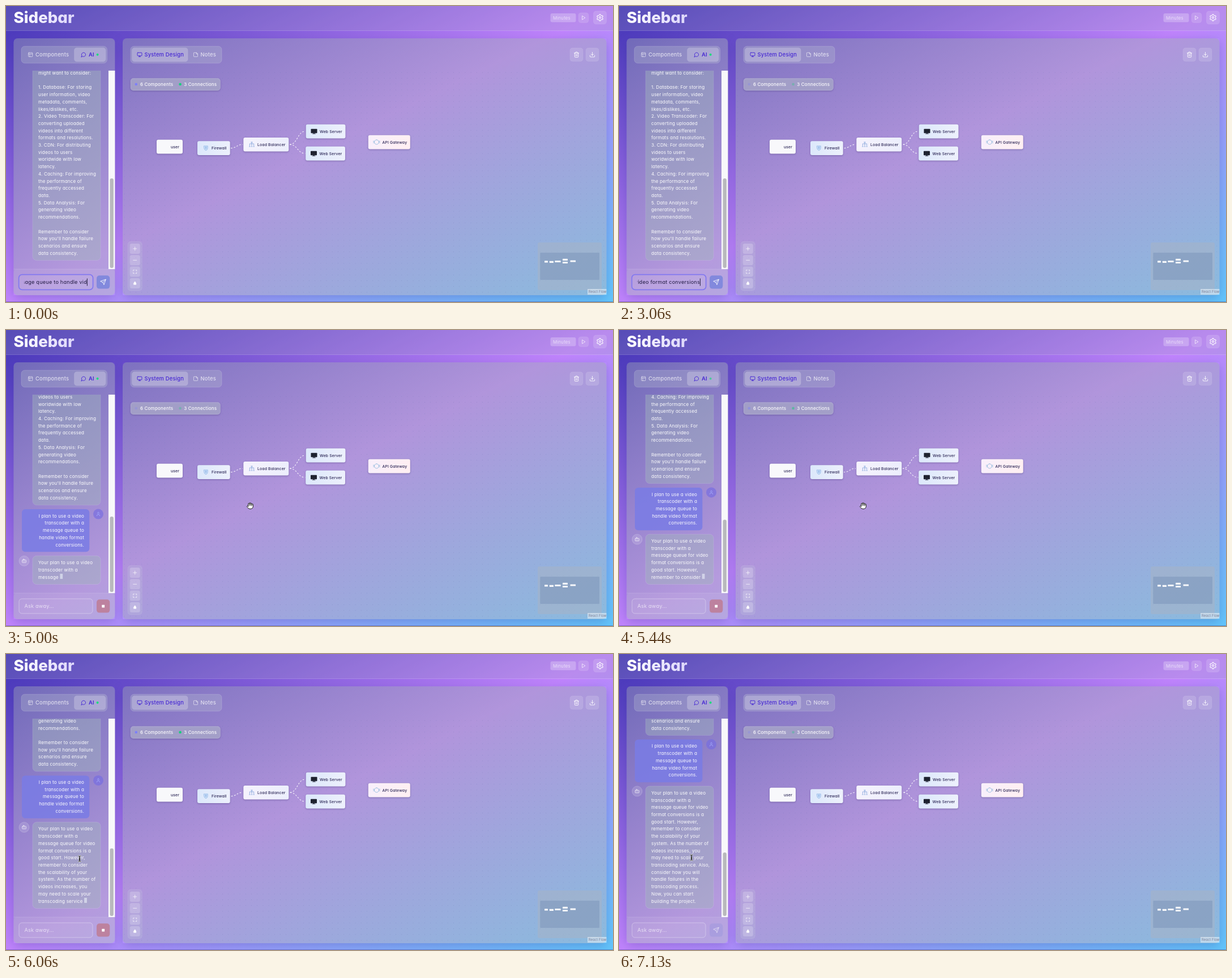
An HTML page for the animation above (7.19 s loop, 1072 px wide and 522 px high).

```html
<!DOCTYPE html>
<html lang="en">
<head>
<meta charset="utf-8">
<title>Sidebar</title>
<style>
html, body { margin: 0; width: 100%; height: 100%; overflow: hidden; background: #8a6be0; }
svg { display: block; }
text { font-family: Inter, "Open Sans", sans-serif; font-feature-settings: "cv11"; letter-spacing: .022em; white-space: pre; }
.icon { fill: none; stroke-linecap: round; stroke-linejoin: round; }
.node { filter: drop-shadow(0 1.5px 1.5px rgba(40, 30, 90, .35)); }
.edge { fill: none; stroke: #fff; stroke-opacity: .85; stroke-width: 1.1; stroke-dasharray: 2.7; }
.shade { filter: blur(9px); }
</style>
</head>
<body>
<svg id="stage" width="1072" height="522" viewBox="0 0 1072 522"></svg>
<script>
const LOOP = 7190, SENT = 3500, REPLY = 4690, TOKEN_MS = 29.6, DONE = 6800;
const LINE = 12.71, BOTTOM = 448.6;
const white = a => `rgba(255,255,255,${a})`;

// Builders
const rect = (x, y, w, h, r, fill, more = "") =>
  `<rect x="${x}" y="${y}" width="${w}" height="${h}" rx="${r}" fill="${fill}" ${more}/>`;
const circle = (x, y, r, fill, more = "") =>
  `<circle cx="${x}" cy="${y}" r="${r}" fill="${fill}" ${more}/>`;
const text = (x, y, str, size, fill, weight = 400, more = "") =>
  `<text x="${x}" y="${y}" font-size="${(size * 1.03).toFixed(2)}" fill="${fill}" font-weight="${weight}" ${more}>${str}</text>`;
const icon = (d, x, y, size, color, width = 2, fill = "none") =>
  `<path class="icon" d="${d}" transform="translate(${x - size / 2} ${y - size / 2}) scale(${size / 24})" stroke="${color}" stroke-width="${width}" style="fill:${fill}"/>`;
const border = a => `stroke="${white(a)}" stroke-width=".8"`;
const lines = (list, x, y, more = "") =>
  list.map((s, i) => text(x, (y + i * LINE).toFixed(2), s, 7.8, white(.97), 400, more)).join("");

const paths = {
  layout: "M5 3h14a2 2 0 0 1 2 2v14a2 2 0 0 1-2 2H5a2 2 0 0 1-2-2V5a2 2 0 0 1 2-2zM3 9h18M9 21V9",
  chat: "M8 20A9 9 0 1 0 4 16L2 22z",
  monitor: "M4 3h16a2 2 0 0 1 2 2v10a2 2 0 0 1-2 2H4a2 2 0 0 1-2-2V5a2 2 0 0 1 2-2zM8 21h8M12 17v4",
  note: "M15 3H5a2 2 0 0 0-2 2v14a2 2 0 0 0 2 2h14a2 2 0 0 0 2-2V9zM15 3v6h6",
  trash: "M3 6h18M19 6v14a2 2 0 0 1-2 2H7a2 2 0 0 1-2-2V6M8 6V4a2 2 0 0 1 2-2h4a2 2 0 0 1 2 2v2M10 11v6M14 11v6",
  download: "M21 15v4a2 2 0 0 1-2 2H5a2 2 0 0 1-2-2v-4M7 10l5 5 5-5M12 15V3",
  play: "M6 3l14 9-14 9z",
  send: "M22 2L11 13M22 2l-7 20-4-9-9-4z",
  user: "M12 3a4 4 0 1 0 .01 0M5 21v-2a4 4 0 0 1 4-4h6a4 4 0 0 1 4 4v2",
  bot: "M12 8V4H8M5 8h14a2 2 0 0 1 2 2v8a2 2 0 0 1-2 2H5a2 2 0 0 1-2-2v-8a2 2 0 0 1 2-2zM9 13v2M15 13v2",
  plus: "M3 12h18M12 3v18",
  minus: "M3 12h18",
  fit: "M3 8V3h5M16 3h5v5M21 16v5h-5M8 21H3v-5",
  lock: "M5 11h14v9H5zM8 11V7a4 4 0 0 1 8 0v4",
  hand: "M6 14V6a2 2 0 0 1 4 0V4a2 2 0 0 1 4 0v2a2 2 0 0 1 4 0v2a2 2 0 0 1 4 0v6a8 8 0 0 1-8 8h-2c-2.8 0-4.5-.9-6-2.3l-3.6-3.6a2 2 0 0 1 2.8-2.9zM10 6v5M14 6v5M18 8v4",
  beam: "M8 2q4 0 4 3v14q0 3-4 3M16 2q-4 0-4 3v14q0 3 4 3M9.5 14h5",
  shield: "M4 3h16v9q0 7-8 10q-8-3-8-10zM9 8h6M9 12h6M12 6v10",
  balance: "M12 3v6M4 18V9h16v9M12 9v9M2 20h4M10 20h4M18 20h4M9 3h6",
  gateway: "M12 4a8 8 0 1 0 .01 0M0 9h4M0 14h4M20 9h4M20 14h4"
};
const gear = "M" + Array.from({ length: 24 }, (_, i) => {
  const a = (i - .5) * Math.PI / 12, r = i % 4 < 2 ? 10.5 : 7.8;
  return (12 + r * Math.sin(a)).toFixed(1) + " " + (12 - r * Math.cos(a)).toFixed(1);
}).join("L") + "zM12 9a3 3 0 1 0 .01 0";

// Copy
const draft = "I plan to use a video transcoder with a message queue to handle video format conversions.";
const advice = `might want to consider:

1. Database: For storing
user information, video
metadata, comments,
likes/dislikes, etc.
2. Video Transcoder: For
converting uploaded
videos into different
formats and resolutions.
3. CDN: For distributing
videos to users
worldwide with low
latency.
4. Caching: For improving
the performance of
frequently accessed
data.
5. Data Analysis: For
generating video
recommendations.

Remember to consider
how you'll handle failure
scenarios and ensure
data consistency.`.split("\n");
const question = ["I plan to use a video", "transcoder with a", "message queue to", "handle video format", "conversions."];
const tokens = `Your plan to use a video
transcoder with a
message queue for video
format conversions is a
good start. However,
remember to consider
the scalability of your
system. As the number of
videos increases, you
may need to scale your
transcoding service. Also,
consider how you will
handle failures in the
transcoding process.
Now, you can start
building the project.`.match(/\s?\w+|[.,]/g);

// Scene parts
const defs = `<defs>
  <linearGradient id="sky" x2="1" y2="1"><stop stop-color="#4234b6"/><stop offset=".5" stop-color="#c084fc"/><stop offset="1" stop-color="#62c6fb"/></linearGradient>
  <linearGradient id="glass" x2="1" y2="1"><stop stop-color="#969db2" stop-opacity=".46"/><stop offset="1" stop-color="#aeb3c3" stop-opacity=".52"/></linearGradient>
  <linearGradient id="logo"><stop stop-color="#fff"/><stop offset="1" stop-color="#ddd7fb"/></linearGradient>
  <linearGradient id="pink"><stop stop-color="#f8effb"/><stop offset="1" stop-color="#ffeff2"/></linearGradient>
  <linearGradient id="ice"><stop stop-color="#dce8fb"/><stop offset="1" stop-color="#edf0fc"/></linearGradient>
  <linearGradient id="lilac"><stop stop-color="#f5f2fd"/><stop offset="1" stop-color="#eceefc"/></linearGradient>
  <pattern id="dots" width="10.2" height="10.2" patternUnits="userSpaceOnUse"><circle cx="5" cy="5" r=".5" fill="#5d6aa8" fill-opacity=".3"/></pattern>
  <clipPath id="chatClip"><rect x="13" y="114" width="168" height="350"/></clipPath>
  <clipPath id="inputClip"><rect x="32" y="475" width="114" height="24"/></clipPath>
  <clipPath id="gaps"><path clip-rule="evenodd" d="M0 44H1072V522H0zM13.4 57h179v453h-179zM206 57h854.5v453H206z"/></clipPath>
</defs>`;

const panels = [[13.4, 179], [206, 854.5]];
const shadows = `<g clip-path="url(#gaps)">` +
  panels.map(([x, w]) => rect(x, 62, w, 453, 7, "rgba(31,38,135,.24)", 'class="shade"')).join("") + `</g>`;
const glass = panels.map(([x, w]) => rect(x, 57, w, 453, 7, "url(#glass)")).join("");
const button = (x, y, w, h, d, size) =>
  rect(x, y, w, h, 4.5, white(.14), border(.1)) + icon(d, x + w / 2, y + h / 2, size, white(.95));

const header = rect(0, 0, 1072, 43.5, 0, "rgba(160,163,185,.22)") + rect(0, 43, 1072, .8, 0, white(.22)) +
  `<text x="13.5" y="30.3" font-size="27.6" font-weight="800" fill="url(#logo)" style="letter-spacing:0">Sidebar</text>` +
  rect(961.5, 13, 45, 15.5, 3, white(.24)) + text(966, 23.6, "Minutes", 7.7, white(.6)) +
  button(1011, 12, 18, 17.5, paths.play, 8.5) + button(1037.5, 9, 23, 23, gear, 13);

const tabBar = (x, w) => rect(x, 71, w, 29.8, 6, "rgba(185,198,208,.28)", border(.2));
const tab = (x, w) => rect(x, 73.7, w, 24.4, 4.5, white(.23), border(.12));
const violet = "#4526d3", muted = white(.7);

const leftPanel = tabBar(27, 151.5) + tab(120.5, 55.5) +
  icon(paths.layout, 43.2, 85.8, 9.5, muted) + text(52, 89.1, "Components", 9.1, muted, 500) +
  icon(paths.chat, 137, 85.8, 9.5, violet, 2.3) + text(146, 89.1, "AI", 9.1, violet, 600) +
  circle(161.6, 85.8, 2, "#16dc7c", 'id="live"') +
  rect(13.4, 464, 179, 46, 6, white(.06)) + rect(13.4, 463.7, 179, .7, 0, white(.18)) +
  rect(181, 114, 11.4, 350, 0, "#f8f8fa") + `<rect id="thumb" x="183.5" width="6.4" rx="3.2" fill="#b9b9bd"/>`;

const bubble = "rgba(160,178,188,.46)";
const adviceH = advice.length * LINE;
const chat = `<g clip-path="url(#chatClip)">
  <g id="advice">${rect(47, -adviceH - 60, 120, adviceH + 60, 7, bubble, border(.14))}
    ${lines(advice, 57, -9.9 - (advice.length - 1) * LINE)}</g>
  <g id="question">${rect(28, 0, 119.3, 75.3, 6, "rgba(122,124,230,.85)")}
    ${lines(question, 138, 14.6, 'text-anchor="end"')}
    ${circle(163, 8.5, 9, "rgba(116,108,226,.65)")}${icon(paths.user, 163, 8.5, 8.5, "#a9b2ff")}</g>
  <g id="reply">${circle(32, 9, 9, white(.14), border(.22))}${icon(paths.bot, 32, 8.8, 9, white(.9))}
    <rect id="replyBox" x="47" rx="7" fill="${bubble}" ${border(.16)}/>
    <g id="replyText">${lines(Array(16).fill(""), 57, 14.9)}</g>
    ${rect(0, 0, 4.8, 9, 0, "rgba(222,226,240,.75)", 'id="block"')}</g></g>`;

const composer = `<g id="ring">${rect(22.6, 473.6, 131, 26.8, 6, white(.06), 'stroke="#8378f0" stroke-width="1.8"')}</g>
  <g id="idle">${rect(23, 474, 130, 26, 5, white(.04), border(.42))}${text(32.5, 490.2, "Ask away...", 8.9, white(.66))}</g>
  <g id="typing" clip-path="url(#inputClip)">${text(143, 490.2, "", 8.9, "#241d45", 400, 'id="draft" text-anchor="end"')}
    ${rect(142.9, 480.5, .9, 13, 0, "#17122f")}</g>
  <g id="send">${rect(160, 475.3, 23.3, 23.3, 5, "rgba(118,130,220,.82)", 'id="sendBox"')}${icon(paths.send, 171.6, 487, 11, white(.95))}</g>
  <g id="stop">${rect(160, 475.3, 23.3, 23.3, 5, "rgba(190,122,144,.82)")}${rect(169.3, 484.8, 4.8, 4.8, .5, "#fff")}</g>`;

const node = (x, y, w, fill, label, tx, art = "") => `<g class="node">${rect(x, y, w, 24.6, 3, fill)}</g>` +
  text(tx, y + 14.8, label, 6.65, "#2b2655", 500) + art;
const screen = (x, y) => rect(x - 5.5, y - 4.3, 11, 7.6, .8, "#1e2230") + rect(x - 1.5, y + 3, 3, 1.5, 0, "#454b5c") +
  rect(x - 3, y + 4.2, 6, .9, .3, "#454b5c");
const edge = (x1, y1, x2, y2) => {
  const m = (x1 + x2) / 2;
  return `<path class="edge" d="M${x1} ${y1}C${m} ${y1} ${m} ${y2} ${x2} ${y2}"/>`;
};
const diagram = edge(397, 250.6, 418, 244.2) + edge(501, 244.2, 528.5, 221) + edge(501, 244.2, 528.5, 260) +
  node(266, 235.8, 46, "#f8f8fb", "user", 291) +
  node(338, 238.3, 57.7, "url(#ice)", "Firewall", 363, icon(paths.shield, 353, 250.6, 10, "#7fa9e2", 1.4, "#cbdff8")) +
  node(419.3, 232, 80, "url(#lilac)", "Load Balancer", 444, icon(paths.balance, 434, 244.3, 11, "#6f97d4", 1.5)) +
  node(529.7, 208.8, 69.8, "url(#ice)", "Web Server", 554, screen(544, 221)) +
  node(529.2, 247.8, 69.8, "url(#ice)", "Web Server", 553.6, screen(543.5, 260)) +
  node(639.8, 227.8, 74, "url(#pink)", "API Gateway", 664.5, icon(paths.gateway, 654.5, 240, 12, "#7fb0d8", 1.5));

const controls = rect(215, 415.5, 25.3, 86.5, 5, "rgba(190,196,215,.24)", border(.1)) +
  ["plus", "minus", "fit", "lock"].map((k, i) => {
    const y = 419 + i * 20.3;
    return rect(218.6, y, 18.2, 18, 3.5, white(.2)) + icon(paths[k], 227.7, y + 9, k == "lock" ? 7 : 8, white(.95), 2.2, k == "lock" ? "#fff" : "none");
  }).join("");

const miniNodes = [[951, 449.3, 6], [959.8, 449.8, 7.2], [969.3, 448.9, 10.3], [983, 445.8, 9], [983, 450.9, 9], [996.5, 448.4, 9.6]];
const minimap = rect(939, 417, 113, 84, 3, "rgba(166,180,200,.58)") + rect(943.3, 435, 104.7, 48, 1, "rgba(122,148,186,.5)") +
  miniNodes.map(([x, y, w]) => rect(x, y, w, 3.2, .4, white(.92))).join("");

const mainPanel = rect(206, 114, 854.5, 396, 0, "url(#dots)") +
  tabBar(220, 161) + tab(222.5, 98.7) +
  icon(paths.monitor, 236, 85.8, 9.5, violet, 2.3) + text(244.5, 89.1, "System Design", 9.1, violet, 500) +
  icon(paths.note, 335, 85.8, 9.5, muted) + text(343.5, 89.1, "Notes", 9.1, muted, 500) +
  `<g class="node">${rect(220, 127.6, 158.5, 21.3, 5, "rgba(172,170,206,.85)", border(.2))}</g>` +
  circle(229.8, 138, 2.3, "#7d80fa", 'id="dotA"') + text(237, 140.9, "6 Components", 7.8, white(.95), 500) +
  circle(307.6, 138, 2.3, "#16d07c", 'id="dotB"') + text(314.3, 140.9, "3 Connections", 7.8, white(.95), 500) +
  button(996, 74, 23, 23.5, paths.trash, 11) + button(1024, 74, 23, 23.5, paths.download, 11) +
  diagram + controls + minimap +
  rect(1027, 499, 33.5, 10, 0, white(.45)) + text(1029, 506.1, "React Flow", 5.6, "#7a7a90");

const pointer = `<g id="pointer"><g id="hand">${icon(paths.hand, 0, 0, 13, "#111", 1.8, "#fff")}</g>
  <g id="beam">${icon(paths.beam, 0, 0, 12, "#fff", 4)}${icon(paths.beam, 0, 0, 12, "#111", 2)}</g></g>`;

const stage = document.getElementById("stage");
stage.innerHTML = defs + rect(0, 0, 1072, 522, 0, "url(#sky)") + shadows + header + glass +
  leftPanel + chat + composer + mainPanel + rect(0, 521, 1072, 1, 0, "rgba(50,45,130,.4)") + pointer;

const el = {};
stage.querySelectorAll("[id]").forEach(n => el[n.id] = n);
const edges = stage.querySelectorAll(".edge"), rows = [...el.replyText.children];

// Motion
const show = (n, on) => n.setAttribute("visibility", on ? "inherit" : "hidden");
const move = (n, x, y) => n.setAttribute("transform", `translate(${x} ${y})`);
const size = (n, props) => Object.entries(props).forEach(([k, v]) => n.setAttribute(k, v));
const pulse = (t, period, low) => low + (1 - low) * (.5 + .5 * Math.cos(2 * Math.PI * (t - 80) / period));
const stops = [[3850, 262, 392], [4130, 317, 361], [4650, 431, 310], [5480, 431, 310], [5920, 130, 361], [6500, 130, 361], [6800, 128, 359]];

function pointerAt(t) {
  const i = stops.findIndex(s => s[0] > t);
  if (i < 0) return stops[stops.length - 1].slice(1);
  const [a, b] = [stops[Math.max(i - 1, 0)], stops[i]];
  const k = a === b ? 0 : (t - a[0]) / (b[0] - a[0]), e = k * k * (3 - 2 * k);
  return [a[1] + (b[1] - a[1]) * e, a[2] + (b[2] - a[2]) * e];
}

function drawChat(t) {
  const sent = t >= SENT, done = t >= DONE;
  const count = Math.max(0, Math.floor((t - REPLY) / TOKEN_MS));
  const said = tokens.slice(0, count).join("").split("\n");
  const height = 12.2 + said.length * LINE, top = BOTTOM - height;
  const asked = top - 82.2;
  move(el.advice, 0, sent ? asked - 7.3 : BOTTOM);
  show(el.question, sent);
  show(el.reply, sent);
  move(el.question, 0, asked);
  move(el.reply, 0, top);
  rows.forEach((row, i) => { row.textContent = said[i] || ""; });
  const end = rows[said.length - 1].getComputedTextLength();
  size(el.replyBox, { width: said.length > 1 ? 120 : Math.min(120, Math.max(26, end + 28)), height });
  size(el.block, { x: end ? 59.5 + end : 58.5, y: 6.2 + (said.length - 1) * LINE });
  show(el.block, sent && !done);

  const content = 739 + (sent ? 88.4 + height : 0), thumb = 116762 / content;
  size(el.thumb, { y: 462 - thumb, height: thumb });
}

function drawComposer(t) {
  const sent = t >= SENT, done = t >= DONE;
  const typed = Math.floor(t < 1630 ? .3 + t / 136 : 12.1 + (t - 1630) / 155);
  el.draft.textContent = draft.slice(0, draft.length - 22 + Math.min(22, typed));
  show(el.ring, !sent);
  show(el.typing, !sent);
  show(el.idle, sent);
  show(el.stop, sent && !done);
  show(el.send, !sent || done);
  el.send.setAttribute("opacity", done ? .6 : 1);
  el.sendBox.setAttribute("opacity", done ? .4 : 1);
}

function draw(t) {
  drawChat(t);
  drawComposer(t);
  edges.forEach(e => e.setAttribute("stroke-dashoffset", -5.4 * (t % 500) / 500 + 5.4));
  el.live.setAttribute("opacity", pulse(t, 1000, .55));
  el.dotA.setAttribute("opacity", pulse(t, 2000, .25));
  el.dotB.setAttribute("opacity", pulse(t, 2000, .3));
  const [x, y] = pointerAt(t);
  show(el.pointer, t >= stops[0][0]);
  move(el.pointer, x, y);
  show(el.hand, x > 200);
  show(el.beam, x <= 200);
}

const start = performance.now();
function tick() {
  draw((performance.now() - start) % LOOP);
  requestAnimationFrame(tick);
}
tick();
</script>
</body>
</html>
```
